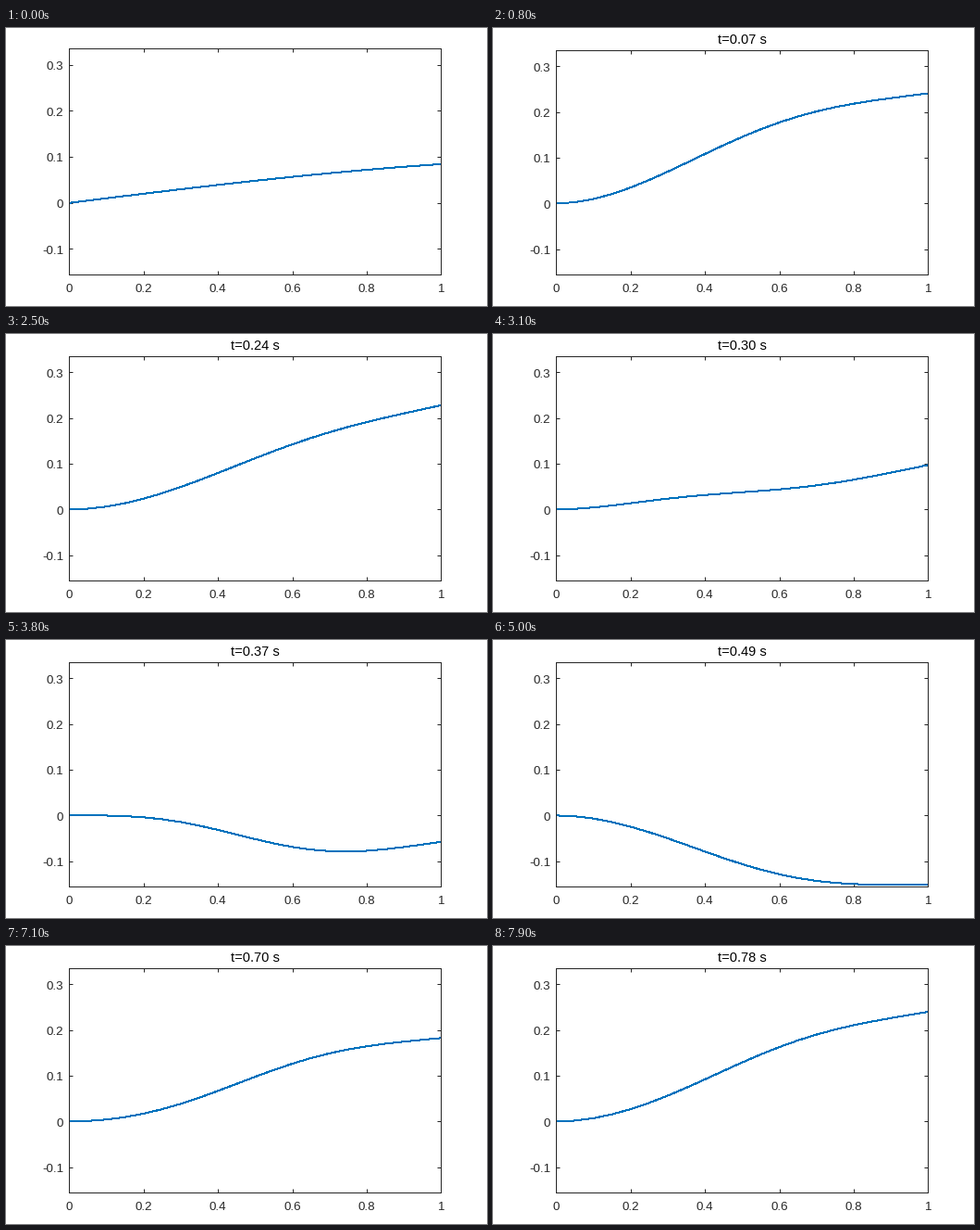
These frames come from a looping animation (520x300 px, 8000 ms). A matplotlib script:

```python
import numpy as np
import matplotlib.pyplot as plt
from matplotlib.animation import FuncAnimation
from matplotlib.transforms import ScaledTranslation

W, H, DPI = 520, 300, 100
PX = 72 / DPI                      # one pixel in points
FRAMES, INTERVAL = 80, 100
INK, BLUE = (0.15, 0.15, 0.15), "#0072BD"

plt.rcParams["font.family"] = "Liberation Sans"

grid = np.linspace(0, 1, 21)
start = 0.1 * np.sin(grid)


def mode(beta):
    """Bending mode of a clamped-free beam, scaled to 1 at the tip."""
    sigma = ((np.cosh(beta) + np.cos(beta))
             / (np.sinh(beta) + np.sin(beta)))
    z = beta * grid
    y = np.cosh(z) - np.cos(z) - sigma * (np.sinh(z) - np.sin(z))
    return y / y[-1]


MODES = np.array([mode(b) for b in (1.8751, 4.6941, 7.8548)])

# Per mode: offset, cosine and sine of the main swing, early transient
WEIGHTS = np.array([
    [0.060, 0.335, -0.002, 0.015],
    [0.000, -0.062, 0.000, -0.024],
    [0.000, -0.011, 0.011, 0.018],
])


def beam(t):
    s, u = t - 0.155, t - 0.035
    damp = np.exp(-0.6 * s)
    parts = [1, damp * np.cos(10 * s), damp * np.sin(10 * s),
             np.exp(-5 * u) * np.cos(18 * u)]
    return WEIGHTS @ parts @ MODES


fig = plt.figure(figsize=(W / DPI, H / DPI), dpi=DPI, facecolor="white")
ax = fig.add_axes([0, 0, 1, 1])
ax.set_xlim(0, 1)
ax.set_ylim(-0.1562, 0.3344)
ax.set_xticks(np.arange(6) / 5, ["0", "0.2", "0.4", "0.6", "0.8", "1"])
ax.set_yticks(np.arange(-1, 4) / 10, ["-0.1", "0", "0.1", "0.2", "0.3"])
ax.tick_params(direction="in", top=True, right=True, length=4 * PX,
               width=PX, color=INK, labelcolor=INK, labelsize=13.33 * PX)
ax.tick_params(axis="x", pad=9.5 * PX)
ax.tick_params(axis="y", pad=6.3 * PX)
drop = ScaledTranslation(0, -0.8 / DPI, fig.dpi_scale_trans)
for label in ax.get_yticklabels():
    label.set_transform(label.get_transform() + drop)
for spine in ax.spines.values():
    spine.set(linewidth=PX, color=INK)

line, = ax.plot(grid, start, color=BLUE, lw=PX, antialiased=False)
title = fig.text(269.5 / W, 1 - 17 / H, "", size=14.67 * PX, color="black",
                 ha="center", va="baseline")


def place_axes(top):
    left, right, bottom = 68.4, 470.4, 266.4
    ax.set_position([left / W, 1 - bottom / H,
                     (right - left) / W, (bottom - top) / H])


def update(i):
    t = (i - 1) / 100
    place_axes(24.4 if i else 22.4)
    title.set_text(f"t={t:.2f} s" if i else "")
    line.set_ydata(beam(t) if i else start)
    return line, title


anim = FuncAnimation(fig, update, frames=FRAMES, interval=INTERVAL,
                     init_func=lambda: update(0), repeat=True,
                     repeat_delay=0, blit=False)
plt.show()
```
